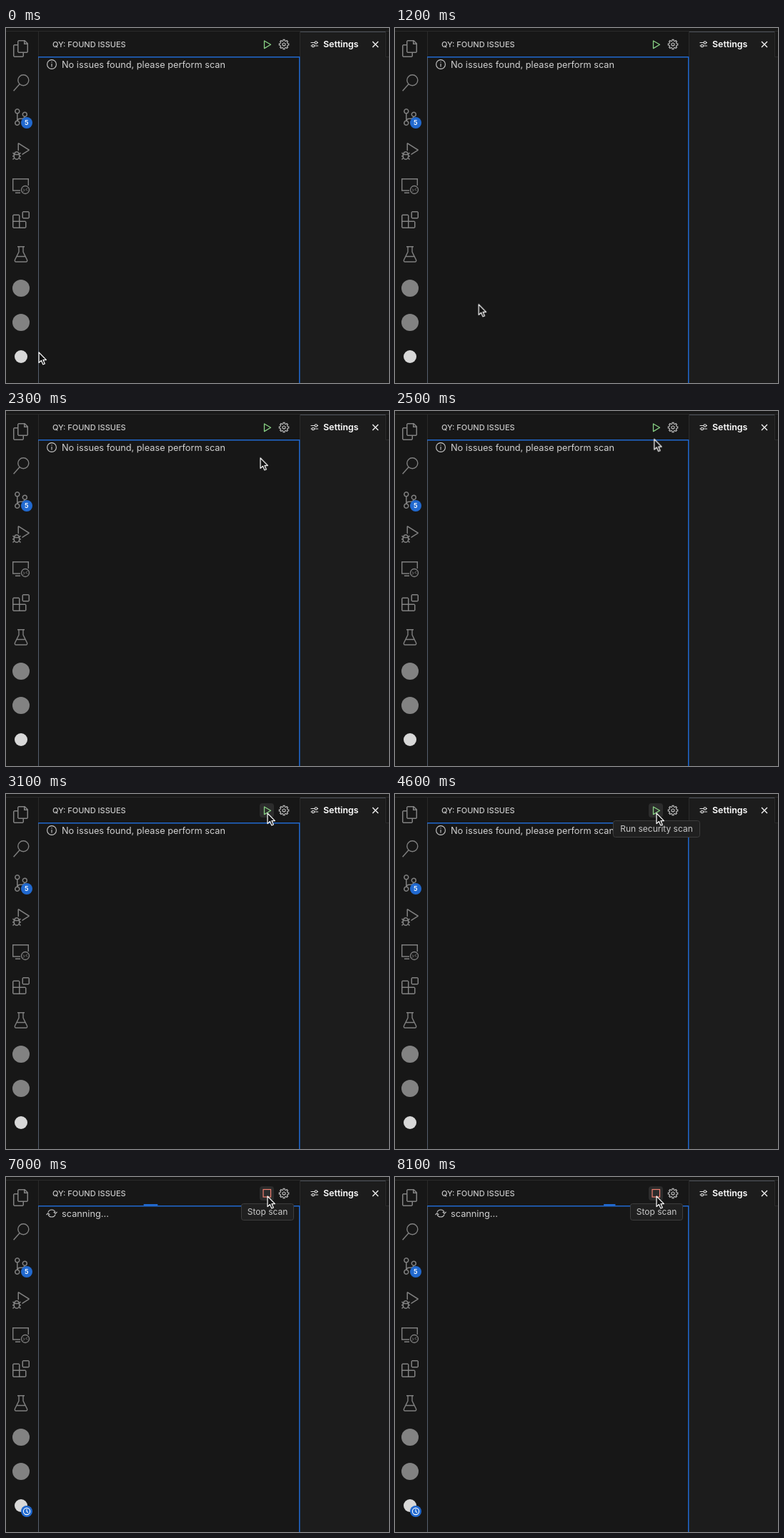
An HTML page for the animation above (8.2 s loop, 536x498 px).

```html
<!DOCTYPE html>
<html lang="en">
<head>
<meta charset="utf-8">
<title>Issue scan</title>
<style>
  html, body { margin: 0; width: 100%; height: 100%; overflow: hidden; background: #171717; }
  svg { display: block; width: 536px; height: 498px; font-family: Inter, Roboto, sans-serif; }
  .line { fill: none; stroke: #808080; stroke-width: 1.4; }
  .glyph { fill: #828282; fill-rule: evenodd; }
  .blue { fill: #2169cf; }
  .small { fill: none; stroke: #c8c8c8; stroke-width: 1.1; }
  .title { font-size: 11px; font-weight: 500; fill: #c8c8c8; }
  .row { font-size: 12.75px; fill: #d0d0d0; }
  .tab { font-size: 12.4px; font-weight: 600; fill: #fff; }
  .tip rect { fill: #202020; stroke: #3d3d3d; }
  .tip text { font-size: 12px; fill: #c8c8c8; text-anchor: middle; }

  .timed { animation: 8.2s linear infinite both; }
  .idle { animation-name: idle; animation-timing-function: step-end; }
  .scan { animation-name: scan; animation-timing-function: step-end; }
  .hover { animation-name: hover; animation-timing-function: step-end; }
  .badge { animation-name: badge; animation-timing-function: step-end; }
  .run-tip { animation-name: run-tip; }
  .stop-tip { animation-name: stop-tip; }
  .bar { animation-name: bar; transform-box: fill-box; transform-origin: center; }
  .cursor { animation-name: cursor; }

  @keyframes idle { 0% { opacity: 1; } 65.85%, 100% { opacity: 0; } }
  @keyframes scan { 0% { opacity: 0; } 65.85%, 100% { opacity: 1; } }
  @keyframes hover { 0% { opacity: 0; } 31.7%, 100% { opacity: 1; } }
  @keyframes badge { 0% { opacity: 0; } 73.16%, 100% { opacity: 1; } }
  @keyframes run-tip {
    0%, 50.6% { opacity: 0; }
    51.8%, 61.5% { opacity: 1; }
    62.8%, 100% { opacity: 0; }
  }
  @keyframes stop-tip { 0%, 78.6% { opacity: 0; } 79.8%, 100% { opacity: 1; } }
  @keyframes bar {
    0%, 64.88% { transform: translateX(0) scaleX(1); }
    89.27% { transform: translateX(2500%) scaleX(3); }
    100% { transform: translateX(3556%) scaleX(2.12); }
  }
  @keyframes cursor {
    0%, 7.4% { transform: translate(46px, 455px); animation-timing-function: cubic-bezier(.45, 0, .75, .6); }
    14.634% { transform: translate(117px, 388px); }
    18.293% { transform: translate(169px, 318px); animation-timing-function: cubic-bezier(.35, .35, .6, .9); }
    28.049% { transform: translate(356px, 66px); animation-timing-function: ease-out; }
    33%, 100% { transform: translate(366px, 27px); }
  }
</style>
</head>
<body>
<svg viewBox="0 0 536 498">
  <defs>
    <path id="tooth" d="M-2 -4.8L-1.2 -5L-1 -6.7H1L1.2 -5L2 -4.8"/>
    <g id="teeth"><use href="#tooth"/><use href="#tooth" transform="rotate(45)"/></g>
  </defs>

  <!-- window areas -->
  <rect width="536" height="498" fill="#171717"/>
  <rect x="412" y="5" width="124" height="493" fill="#1c1c1c"/>
  <rect x="532" y="5" width="4" height="35" fill="#171717"/>
  <path d="M0 4.5H536M45.5 5V40M411.5 5V40M531.5 5V40.5H536" fill="none" stroke="#2b2b2b"/>
  <path d="M412 5.5H531" stroke="#4a4f57"/>
  <path d="M45.5 41V498" stroke="#56606e"/>
  <path d="M45 40.75H410.75V498" fill="none" stroke="#2169cf" stroke-width="1.5"/>

  <!-- activity bar -->
  <g class="glyph">
    <path transform="translate(9 17)" d="M17.5 0h-9L7 1.5V6H2.5L1 7.5v15.07L2.5 24h12.07L16 22.57V18h4.7l1.3-1.43V4.5L17.5 0zm0 2.12l2.38 2.38H17.5V2.12zm-3 20.38h-12v-15H7v9.07L8.5 18h6v4.5zm6-6h-12v-15H16V6h4.5v10.5z"/>
    <path transform="translate(9 113)" d="M21.007 8.222A3.738 3.738 0 0 0 15.045 5.2a3.737 3.737 0 0 0 1.156 6.583 2.988 2.988 0 0 1-2.668 1.67h-2.99a4.456 4.456 0 0 0-2.989 1.165V7.4a3.737 3.737 0 1 0-1.494 0v9.117a3.776 3.776 0 1 0 1.816.099 2.99 2.99 0 0 1 2.668-1.667h2.99a4.484 4.484 0 0 0 4.223-3.039 3.736 3.736 0 0 0 3.25-3.687zM4.565 3.738a2.242 2.242 0 1 1 4.484 0 2.242 2.242 0 0 1-4.484 0zm4.484 16.441a2.242 2.242 0 1 1-4.484 0 2.242 2.242 0 0 1 4.484 0zm8.221-9.715a2.242 2.242 0 1 1 0-4.485 2.242 2.242 0 0 1 0 4.485z"/>
    <path transform="translate(9 161)" d="M10.94 13.5l-1.32 1.32a3.73 3.73 0 0 0-7.24 0L1.06 13.5 0 14.56l1.72 1.72-.22.22V18H0v1.5h1.5v.08c.077.489.214.966.41 1.42L0 22.94 1.06 24l1.65-1.65A4.308 4.308 0 0 0 6 24a4.31 4.31 0 0 0 3.29-1.65L10.94 24 12 22.94 10.09 21c.198-.464.336-.951.41-1.45v-.1H12V18h-1.5v-1.5l-.22-.22L12 14.56l-1.06-1.06zM6 13.5a2.25 2.25 0 0 1 2.25 2.25h-4.5A2.25 2.25 0 0 1 6 13.5zm3 6a3.33 3.33 0 0 1-3 3 3.33 3.33 0 0 1-3-3v-2.25h6v2.25zm14.76-9.9v1.26L13.5 17.37V15.6l8.5-5.37L9 2v9.46a5.07 5.07 0 0 0-1.5-.72V.63L8.64 0l15.12 9.6z"/>
    <path transform="translate(9 257)" d="M13.5 1.5L15 0h7.5L24 1.5V9l-1.5 1.5H15L13.5 9V1.5zm1.5 0V9h7.5V1.5H15zM0 15V6l1.5-1.5H9L10.5 6v7.5H18l1.5 1.5v7.5L18 24H1.5L0 22.5V15zm9-1.5V6H1.5v7.5H9zM9 15H1.5v7.5H9V15zm1.5 7.5H18V15h-7.5v7.5z"/>
    <circle cx="21" cy="365" r="12"/>
    <circle cx="21" cy="413" r="12"/>
  </g>
  <g class="line">
    <circle cx="24.3" cy="73.3" r="7.5"/>
    <path d="M19 78.7L10.6 88.3"/>
    <path d="M20 228H9.7V211.7H31.3V221M13 231.3H20"/>
    <circle cx="27" cy="227" r="5.5" stroke-width="1.3"/>
    <path d="M24 225.5L26 227.5L24 229.5M30 224.5L28 226.5L30 228.5" stroke-width="1"/>
    <path d="M16 306.8H26M18 307V314L12.4 325.5Q12 328 14 328H28Q30 328 29.6 325.5L24 314V307M15 320.5H27"/>
  </g>
  <circle cx="21" cy="461" r="9" fill="#d8d8d8"/>
  <circle class="blue" cx="29" cy="133" r="8"/>
  <text x="28.8" y="136.3" font-size="9" font-weight="600" fill="#fff" text-anchor="middle">5</text>
  <g class="timed badge">
    <circle class="blue" cx="29" cy="469" r="8"/>
    <path d="M29 466V469.3L31 470.7M33.6 469A4.6 4.6 0 1 1 24.4 469A4.6 4.6 0 1 1 33.6 469" fill="none" stroke="#fff" stroke-width="1.1"/>
  </g>

  <!-- panel header -->
  <text class="title" x="65" y="27">QY: FOUND ISSUES</text>
  <rect class="timed hover" x="355" y="13" width="20" height="20" rx="4" fill="#2c2c2c"/>
  <g class="small" transform="translate(389 23)">
    <use href="#teeth"/>
    <use href="#teeth" transform="rotate(90)"/>
    <use href="#teeth" transform="rotate(180)"/>
    <use href="#teeth" transform="rotate(270)"/>
    <circle r="2"/>
  </g>

  <g class="timed idle">
    <path d="M361.5 18L370.5 23.3L361.5 28.6Z" fill="none" stroke="#89d185" stroke-width="1.3" stroke-linejoin="round"/>
    <circle class="small" cx="64" cy="51" r="6.4"/>
    <path class="small" d="M64 50V54.5M64 47.2V48.6"/>
    <text class="row" x="78" y="56">No issues found, please perform scan</text>
  </g>
  <g class="timed scan">
    <rect x="360" y="17.5" width="10.5" height="10.5" fill="none" stroke="#f07f70" stroke-width="1.2"/>
    <path class="small" d="M59 49.5A5.3 5.3 0 0 1 69 49.5M69 52.5A5.3 5.3 0 0 1 59 52.5M66.7 49L69.2 51.3L71.5 49M56.5 53L58.8 50.7L61.3 53"/>
    <text class="row" x="78" y="56">scanning...</text>
    <rect class="blue timed bar" x="45" y="38" width="7.32" height="2"/>
  </g>

  <!-- editor tab -->
  <g fill="none" stroke="#e0e0e0" stroke-width="1.1">
    <path d="M426.5 20.5H432M435.6 20.5H437M426.5 25H428M431.6 25H437"/>
    <circle cx="433.8" cy="20.5" r="1.7"/>
    <circle cx="429.8" cy="25" r="1.7"/>
    <path d="M513 19L521 27M521 19L513 27" stroke="#fff" stroke-width="1.2"/>
  </g>
  <text class="tab" x="444" y="27">Settings</text>

  <!-- overlays -->
  <g class="tip timed run-tip">
    <rect x="305.5" y="37.5" width="121" height="23" rx="3"/>
    <text x="366" y="53">Run security scan</text>
  </g>
  <g class="tip timed stop-tip">
    <rect x="329.5" y="37.5" width="73" height="23" rx="3"/>
    <text x="366" y="53">Stop scan</text>
  </g>
  <path class="timed cursor" d="M0 0V14.6L3.4 11.5L5.8 17L8.3 16L5.9 10.6H10.4Z" fill="#111" stroke="#fff" stroke-width="1.2" stroke-linejoin="round"/>
</svg>
</body>
</html>
```
